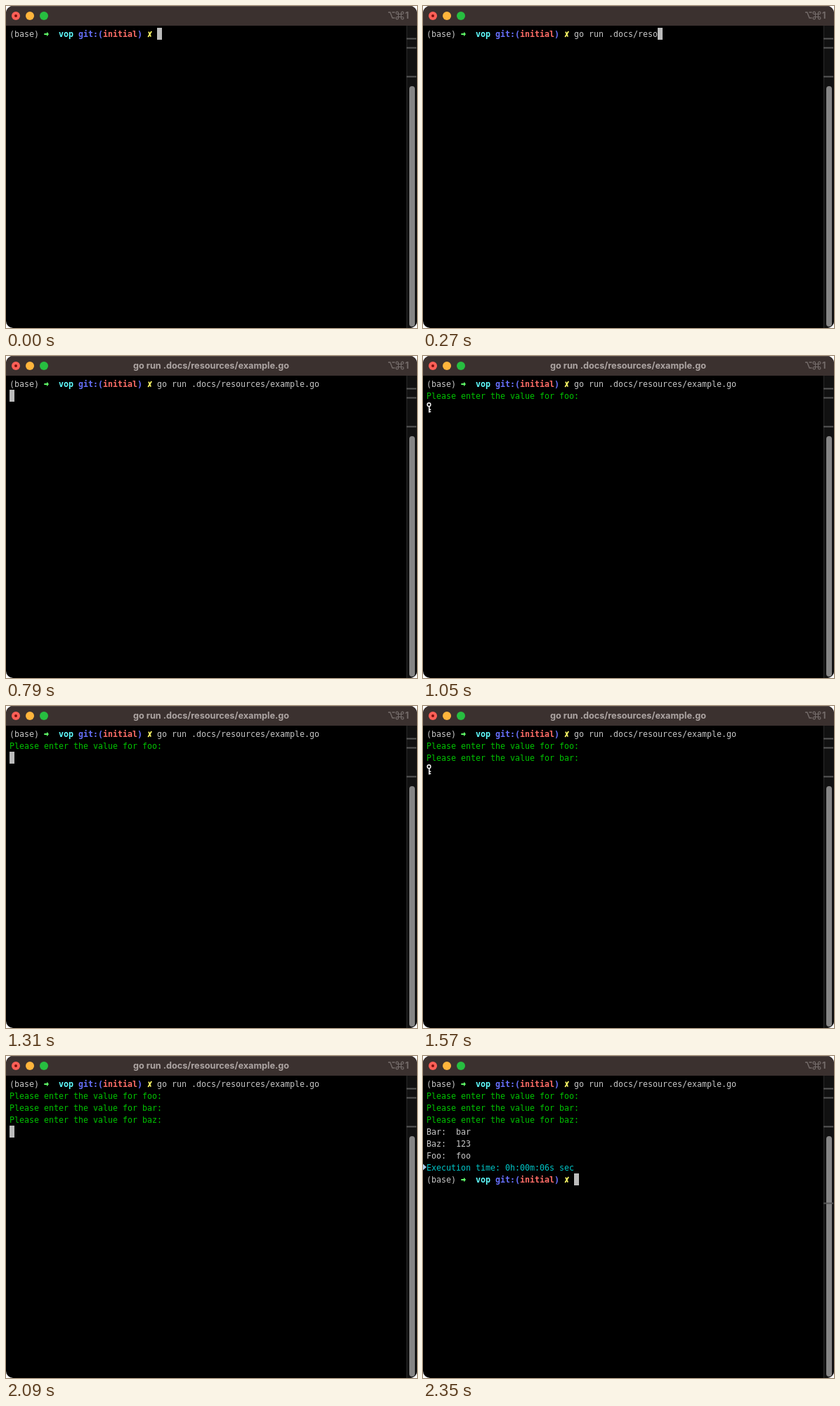
Write an HTML page that moves like this. It is 585x458 px and loops after 3.39 s.

```html
<!DOCTYPE html>
<html lang="en">
<head>
<meta charset="utf-8">
<title>Terminal</title>
<style>
  html, body { margin: 0; width: 100%; height: 100%; overflow: hidden; background: #fff; }
  svg { display: block; width: 585px; height: 458px; }
  .mono text { font: 11.63px "DejaVu Sans Mono", monospace; white-space: pre; }
  .mono .bold { font-weight: 700; }
  .bar text { font: 700 12.7px Inter, sans-serif; }
</style>
</head>
<body>
<svg viewBox="0 0 585 458">
  <defs>
    <clipPath id="window"><rect width="585" height="458" rx="10"/></clipPath>
    <g id="key" fill="none" stroke="#fff">
      <circle cx="3.5" cy="4.2" r="2.4" stroke-width="1.4"/>
      <path d="M3.8 6.6V15.5M4 11.2H6.3M4 14.3H6.3" stroke-width="1.5"/>
    </g>
    <g id="arrow"><path d="M.3 8H4V5.7L7 9 4 12.3V10H.3Z" fill="#5ffa68"/></g>
    <g id="cross"><path d="M2 5.6 5.2 12.7M6.2 5 1.2 13" fill="none" stroke="#fefb67" stroke-width="1.7"/></g>
  </defs>
  <g clip-path="url(#window)">
    <rect width="585" height="458"/>
    <g class="bar">
      <rect width="585" height="28" fill="#3b312f"/>
      <path d="M0 .5H585" stroke="#534947"/>
      <circle cx="14" cy="14" r="6" fill="#ff5f57"/>
      <circle cx="14" cy="14" r="2" fill="#7d100b"/>
      <circle cx="34" cy="14" r="6" fill="#ffb53c"/>
      <circle cx="54" cy="14" r="6" fill="#27be40"/>
      <text id="title" x="292" y="18" text-anchor="middle" fill="#ada5a3">go run .docs/resources/example.go</text>
      <g fill="none" stroke="#746c6a" stroke-width="1.4">
        <path d="M544 9H546.8L550 17H553.5M549.5 9H553.5"/>
        <path d="M558.5 11.5H562.5V15.5H558.5ZM558.5 11.5H557A1.7 1.7 0 1 1 558.5 9.8ZM562.5 11.5V9.8A1.7 1.7 0 1 1 564 11.5ZM562.5 15.5H564A1.7 1.7 0 1 1 562.5 17.2ZM558.5 15.5V17.2A1.7 1.7 0 1 1 557 15.5Z" stroke-width="1.2"/>
      </g>
      <text x="568" y="17.5" fill="#746c6a">1</text>
    </g>
    <rect x="570" y="28" width="15" height="430" fill="#111"/>
    <path d="M570.5 28V458" stroke="#2b2b2b"/>
    <rect x="574" y="114" width="8" height="342" rx="4" fill="#858585"/>
    <path d="M570 46.5H584M570 59.5H584M570 100.5H584" stroke="#575757" stroke-width="2"/>
    <path id="newMark" d="M570 209.5H584" stroke="#575757" stroke-width="2"/>
    <g id="screen" class="mono"></g>
  </g>
</svg>
<script>
const COL = 7, ROW = 17, LEFT = 5, TOP = 31, LOOP = 3390;
const GRAY = '#c7c7c7', GREEN = '#00c200', CYAN = '#00c5c7';
const BLUE = '#6871ff', RED = '#ff6d67', AQUA = '#60fdff';
const COMMAND = 'go run .docs/resources/example.go';
const $ = id => document.getElementById(id);

const text = (col, row, str, color, bold) =>
  `<text x="${LEFT + col * COL}" y="${TOP + 13 + row * ROW}" fill="${color}"${bold ? ' class="bold"' : ''}>${str}</text>`;
const glyph = (id, col, row) =>
  `<use href="#${id}" x="${LEFT + col * COL}" y="${TOP + row * ROW}"/>`;
const cursor = (col, row) =>
  `<rect x="${LEFT + col * COL}" y="${TOP + row * ROW}" width="7" height="17" fill="#bbb"/>`;

const prompt = row =>
  text(0, row, '(base)', GRAY) + glyph('arrow', 7, row) +
  text(10, row, 'vop', AQUA, true) + text(14, row, 'git:(', BLUE, true) +
  text(19, row, 'initial', RED, true) + text(26, row, ')', BLUE, true) +
  glyph('cross', 28, row);

const typed = n => text(30, 0, COMMAND.slice(0, n), GRAY) + cursor(30 + n, 0);

const asking = (count, secret) =>
  text(30, 0, COMMAND, GRAY) +
  ['foo', 'bar', 'baz'].slice(0, count)
    .map((name, i) => text(0, i + 1, `Please enter the value for ${name}:`, GREEN)).join('') +
  (secret ? glyph('key', 0, count + 1) : cursor(0, count + 1));

const results = () =>
  asking(3, true).replace(glyph('key', 0, 4), '') +
  ['Bar:  bar', 'Baz:  123', 'Foo:  foo'].map((s, i) => text(0, i + 4, s, GRAY)).join('') +
  '<path d="M0 153.5 5 158 0 162.5Z" fill="#a9cbea"/>' +
  text(0, 7, 'Execution time: 0h:00m:06s sec', CYAN) +
  prompt(8) + cursor(30, 8);

// start time, screen contents, whether the program is running
const steps = [
  [0, typed(0)],
  [270, typed(17)],
  [530, typed(COMMAND.length)],
  [790, asking(0, false), true],
  [1050, asking(1, true), true],
  [1310, asking(1, false), true],
  [1570, asking(2, true), true],
  [1830, asking(3, true), true],
  [2090, asking(3, false), true],
  [2350, results()]
];

let shown = -1;
const start = performance.now();

function draw(now) {
  const t = Math.max(0, now - start) % LOOP;
  const i = steps.filter(s => s[0] <= t).length - 1;
  if (i !== shown) {
    shown = i;
    const [, content, running] = steps[i];
    $('screen').innerHTML = prompt(0) + content;
    $('title').style.display = running ? '' : 'none';
    $('newMark').style.display = i === steps.length - 1 ? '' : 'none';
  }
  requestAnimationFrame(draw);
}
draw(start);
</script>
</body>
</html>
```
